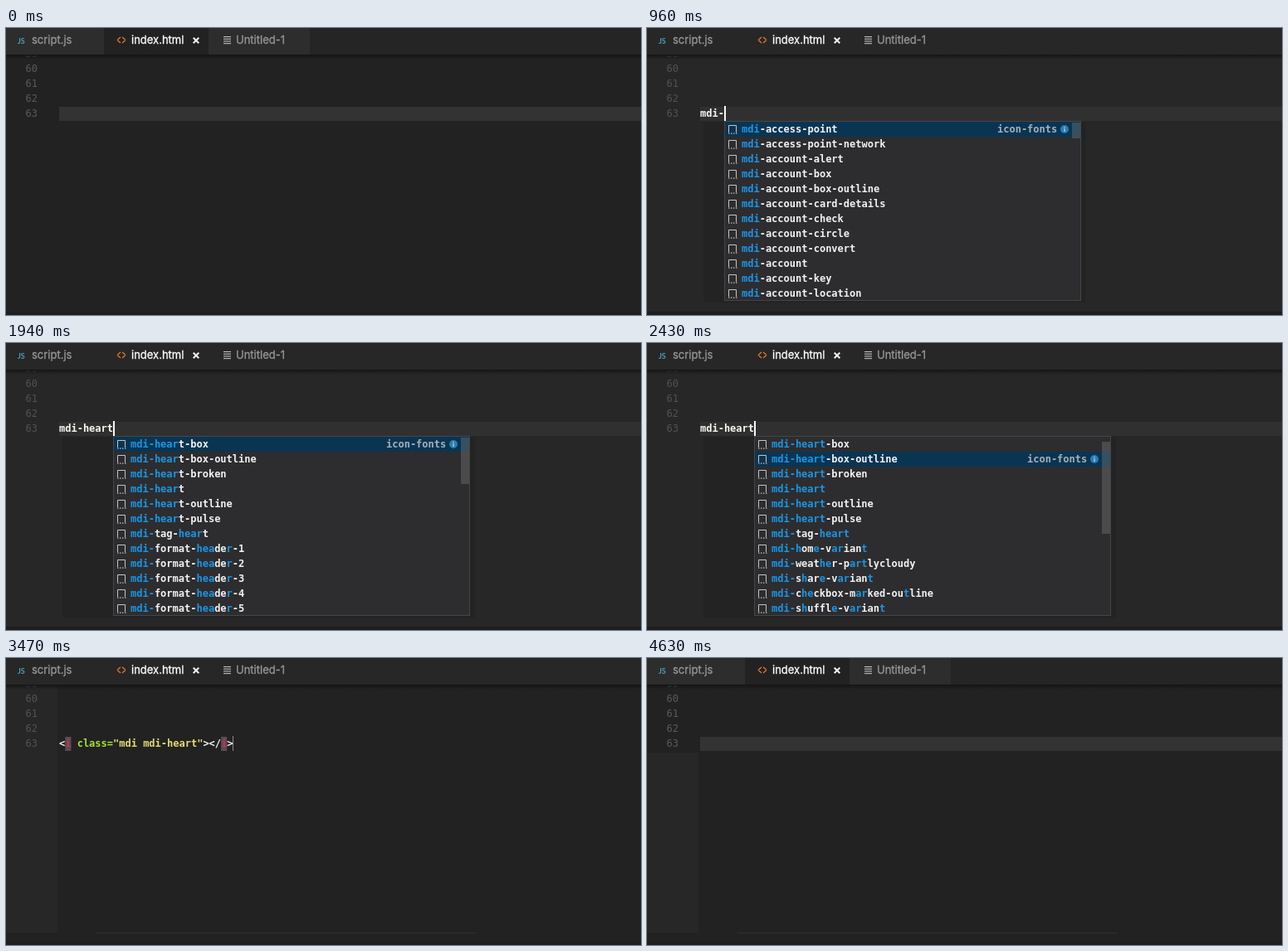
Recreate the animation shown at these times as an HTML page with a canvas. Size 765 by 346 pixels, loop 4910 ms.

```html
<!DOCTYPE html>
<html lang="en">
<head>
<meta charset="utf-8">
<title>Icon autocomplete</title>
<style>
  html, body { margin: 0; width: 100%; height: 100%; overflow: hidden; background: #222; }
  canvas { display: block; }
</style>
</head>
<body>
<canvas id="stage" width="765" height="346"></canvas>
<script>
const ctx = document.getElementById('stage').getContext('2d');
const LOOP = 4910, CHAR = 7.224, LEFT = 64, ROW = 18, LINE_Y = 103;
const MONO = '12px "DejaVu Sans Mono", monospace';
const BOLD = 'bold ' + MONO;
const UI = '13px Inter, sans-serif';

const names = (prefix, text) => text.split(' ').map(s => prefix + s);
const access = names('mdi-', 'access-point access-point-network account-alert account-box ' +
  'account-box-outline account-card-details account-check account-circle account-convert ' +
  'account account-key account-location');
const hearts = names('mdi-heart', '-box -box-outline -broken  -outline -pulse');
const head = names('mdi-head', 'phones-box phones phones-settings set-dock set set-off').concat(hearts);
const headers = [...hearts, 'mdi-tag-heart', ...names('mdi-format-header-', '1 2 3 4 5')];
const fuzzy = [...hearts, ...names('mdi-', 'tag-heart home-variant weather-partlycloudy ' +
  'share-variant checkbox-marked-outline shuffle-variant')];

// Scrollbar thumb extents for each list
const thumbs = new Map([[access, [114, 133]], [head, [114, 141]], [headers, [114, 170]], [fuzzy, [119, 230]]]);

const scene = (at, typed, list, match, sel = 0, caret = true) => ({ at, typed, list, match, sel, caret });
const scenes = [
  scene(0, '', null, '', 0, false),
  scene(400, 'm', access, 'm'),
  scene(530, 'md', access, 'md'),
  scene(680, 'mdi', access, 'mdi'),
  scene(830, 'mdi-', access, 'mdi'),
  scene(1110, 'mdi-', access, 'mdi-'),
  scene(1380, 'mdi-he', head, 'mdi-he'),
  scene(1510, 'mdi-hea', head, 'mdi-hea'),
  scene(1660, 'mdi-hear', head, 'mdi-hea'),
  scene(1790, 'mdi-hear', headers, 'mdi-hear'),
  scene(1940, 'mdi-heart', headers, 'mdi-hear'),
  scene(2060, 'mdi-heart', fuzzy, 'mdi-heart'),
  scene(2430, 'mdi-heart', fuzzy, 'mdi-heart', 1),
  scene(2570, 'mdi-heart', fuzzy, 'mdi-heart', 2, false),
  scene(2690, 'mdi-heart', fuzzy, 'mdi-heart', 3, false),
  scene(3050, 'tag', null, ''),
  scene(4020, 'm', null, ''),
  scene(4180, '', null, ''),
  scene(4630, '', null, '', 0, false)
];

const tagParts = [
  ['<', '#f8f8f2'], ['i', '#e0245e'], [' class=', '#a6e22e'], ['"mdi mdi-heart"', '#e6db74'],
  ['></', '#f8f8f2'], ['i', '#e0245e'], ['>', '#f8f8f2']
];
const tagLength = tagParts.reduce((n, part) => n + part[0].length, 0);

function box(x, y, w, h, color) {
  ctx.fillStyle = color;
  ctx.fillRect(x, y, w, h);
}

function label(text, x, mid, color, font = BOLD) {
  ctx.font = font;
  ctx.fillStyle = color;
  ctx.fillText(text, x, mid + 4);
}

function path(points, color, width) {
  ctx.beginPath();
  for (let i = 0; i < points.length; i += 4) {
    ctx.moveTo(points[i], points[i + 1]);
    ctx.lineTo(points[i + 2], points[i + 3]);
  }
  ctx.strokeStyle = color;
  ctx.lineWidth = width;
  ctx.stroke();
}

function tabText(text, x, color) {
  label(text, x, 15, color, UI);
  ctx.strokeStyle = color;
  ctx.lineWidth = 0.3;
  ctx.strokeText(text, x, 19);
}

function drawTabs(flat) {
  box(0, 0, 765, 32, flat ? '#272727' : '#252525');
  if (!flat) {
    box(0, 0, 118, 32, '#2d2d2d');
    box(118, 0, 126, 32, '#222222');
    box(244, 0, 122, 32, '#2d2d2d');
  }
  const shade = ctx.createLinearGradient(0, 32, 0, 38);
  shade.addColorStop(0, 'rgba(18,18,18,.85)');
  shade.addColorStop(1, 'rgba(18,18,18,0)');
  box(0, 32, 765, 6, shade);

  label('JS', 14, 14.5, '#519aba', 'bold 9px Lato, sans-serif');
  tabText('script.js', 31, '#969696');
  path([138, 11, 134, 14.5, 134, 14.5, 138, 18, 140, 11, 144, 14.5, 144, 14.5, 140, 18], '#e37933', 1.2);
  tabText('index.html', 151, '#ffffff');
  path([225.7, 11.7, 232.3, 18.3, 232.3, 11.7, 225.7, 18.3], '#f0f0f0', 2);
  for (let i = 0; i < 4; i++) box(262, 10 + i * 2.7, 9, 1.1, '#c0c0c0');
  tabText('Untitled-1', 277, '#969696');
}

function drawNumbers(flat) {
  ctx.save();
  ctx.beginPath();
  ctx.rect(0, 33, 62, 313);
  ctx.clip();
  for (let n = 59; n <= 63; n++) {
    label(n, 23.5, LINE_Y - (63 - n) * ROW, flat ? '#525252' : '#5a5a5a', MONO);
  }
  ctx.restore();
}

// Marks the letters of the query in order, as a fuzzy matcher does
function drawMatch(text, query, x, mid) {
  let next = 0;
  [...text].forEach((ch, i) => {
    const hit = ch === query[next];
    if (hit) next++;
    label(ch, x + i * CHAR, mid, hit ? '#1a97e6' : '#f2f2f2');
  });
}

function drawIcon(x, mid) {
  const l = x + 0.5, r = x + 9.5, t = mid - 4.5, b = mid + 5;
  path([l, b - 1, l, t, l, t, r, t, r, t, r, b - 1], '#c5c5c5', 1);
  for (let i = 0; i < 4; i++) box(x + i * 3, b - 0.5, 1.5, 1.2, '#c5c5c5');
}

function drawPopup(s) {
  const x = Math.round(LEFT + s.typed.length * CHAR);
  box(68, 113, x + 436 - 68, 218, '#232323');
  box(x, 112, 430, 217, '#454545');
  box(x + 1, 113, 428, 215, '#2d2d30');

  const selY = 113 + s.sel * ROW;
  box(x + 1, selY, 428, ROW, '#0a3552');
  const [top, end] = thumbs.get(s.list);
  box(x + 419, top, 10, end - top, 'rgba(121,121,121,.4)');

  s.list.forEach((name, i) => {
    const mid = 122 + i * ROW;
    drawIcon(x + 5, mid);
    drawMatch(name, s.match, x + 21, mid);
  });

  const mid = selY + 9;
  label('icon-fonts', x + 329, mid, '#a5b1b9');
  ctx.beginPath();
  ctx.arc(x + 410, mid, 5, 0, Math.PI * 2);
  ctx.fillStyle = '#2b7db3';
  ctx.fill();
  box(x + 409.4, mid - 3, 1.3, 1.3, '#b8d4e6');
  box(x + 409.4, mid - 0.8, 1.3, 3.8, '#b8d4e6');
}

function drawTag(t) {
  let x = LEFT;
  for (const [text, color] of tagParts) {
    if (text === 'i' && t >= 3470) box(x, 95, CHAR, 17, '#505050');
    label(text, x, LINE_Y, color);
    x += text.length * CHAR;
  }
}

function draw(t) {
  const s = scenes.findLast(item => item.at <= t);
  const tag = s.typed === 'tag';
  const flat = t >= 400 && t < 4020;

  box(0, 0, 765, 346, flat && !tag ? '#272727' : '#222222');
  if (tag) box(0, 32, 62, 299, '#272727');
  if (t >= 4020) box(0, 114, 62, 217, '#272727');
  if (t >= 3050) box(109, 331, 457, 1, '#2f2f2f');
  box(0, 342, 765, 4, '#1e1e1e');
  drawNumbers(flat);
  drawTabs(flat);

  if (!tag) box(LEFT, 95, 701, 17, flat ? '#303030' : '#333333');
  if (s.list) drawPopup(s);
  if (tag) drawTag(t);
  else label(s.typed, LEFT, LINE_Y, '#f8f8f2');

  if (s.caret) {
    const cols = tag ? tagLength : s.typed.length;
    box(Math.round(LEFT + cols * CHAR), 94, tag ? 1 : 2, 18, tag ? '#8a8a8a' : '#f8f8f0');
  }
}

function tick() {
  draw(performance.now() % LOOP);
  requestAnimationFrame(tick);
}
tick();
</script>
</body>
</html>
```
